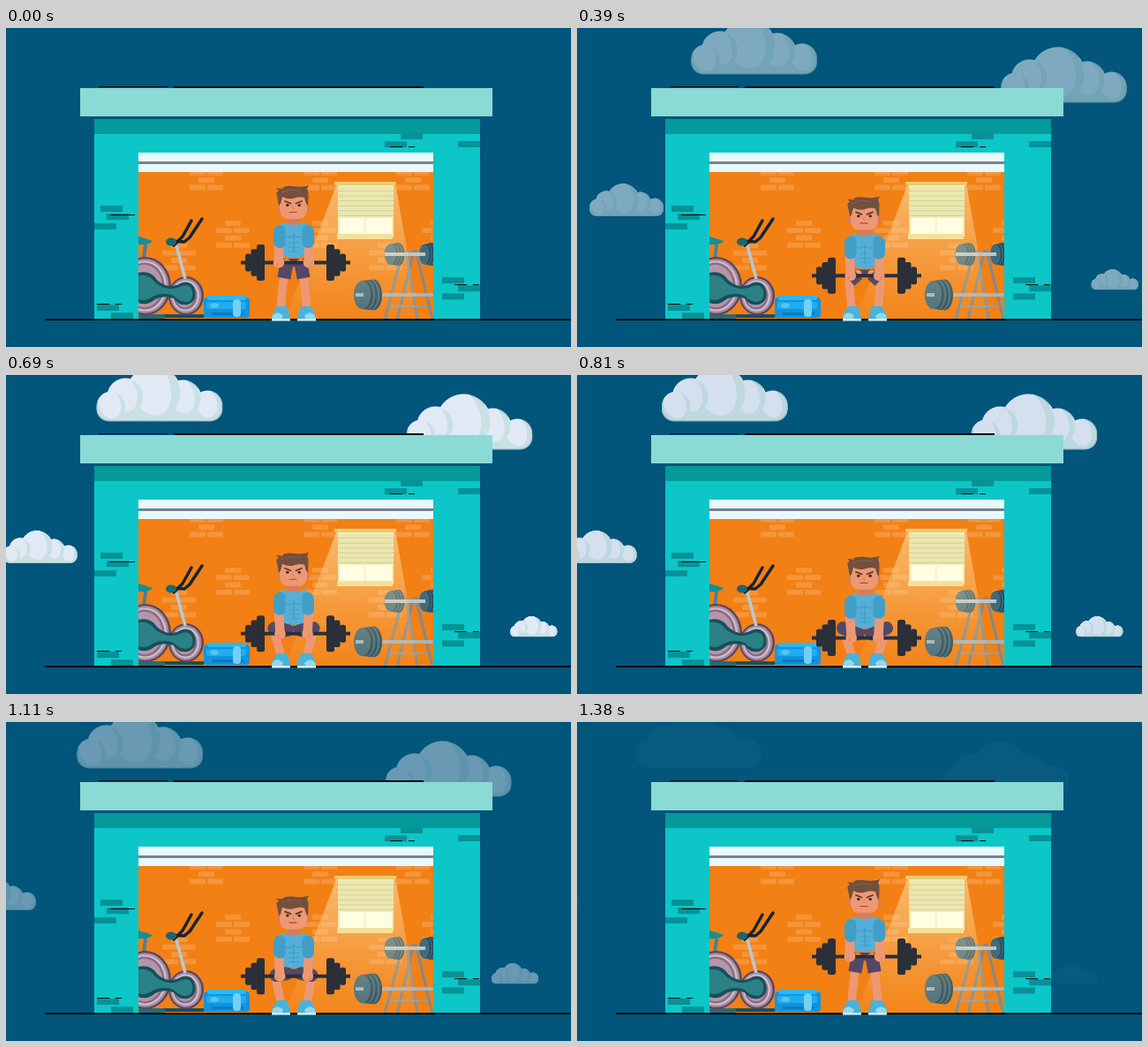
Recreate the animation shown at these times as an HTML page with a canvas. Size 640x361 px, loop 1410 ms.

```html
<!DOCTYPE html>
<html lang="en">
<head>
<meta charset="utf-8">
<title>Garage workout</title>
<style>
html, body { margin: 0; width: 100%; height: 100%; overflow: hidden; background: #02557b; }
canvas { display: block; }
</style>
</head>
<body>
<canvas id="stage" width="640" height="361"></canvas>
<script>
const LOOP = 1410, STEP = 30;
let g = document.getElementById('stage').getContext('2d');

const lerp = (a, b, k) => a + (b - a) * k;

function rect(x, y, w, h, color) {
  g.fillStyle = color;
  g.fillRect(x, y, w, h);
}
function round(x, y, w, h, r, color) {
  g.fillStyle = color;
  g.beginPath();
  g.roundRect(x, y, w, h, r);
  g.fill();
}
function oval(x, y, rx, ry, color, angle = 0) {
  g.fillStyle = color;
  g.beginPath();
  g.ellipse(x, y, rx, ry, angle, 0, Math.PI * 2);
  g.fill();
}
function line(points, width, color, cap = 'round') {
  g.strokeStyle = color;
  g.lineWidth = width;
  g.lineCap = cap;
  g.lineJoin = 'round';
  g.beginPath();
  points.forEach(([x, y]) => g.lineTo(x, y));
  g.stroke();
}
function shape(d, color) {
  g.fillStyle = color;
  g.fill(new Path2D(d));
}
function layer(w, h, draw) {
  const c = document.createElement('canvas'), main = g;
  c.width = w;
  c.height = h;
  g = c.getContext('2d');
  draw();
  g = main;
  return c;
}
// Draws something and its mirror image about a vertical axis.
function mirrored(axis, draw) {
  draw();
  g.save();
  g.translate(axis * 2, 0);
  g.scale(-1, 1);
  draw();
  g.restore();
}

// ---------- clouds ----------
const CLOUD_W = 146, CLOUD_H = 66;
const cloud = layer(CLOUD_W * 2, CLOUD_H * 2, () => {
  g.scale(2, 2);
  g.translate(1.5, 1.5);
  const lobes = [[126, 45, 17], [98, 37, 21], [65, 31, 31], [33, 35, 21], [17, 46, 17]];
  const silhouette = (inset, color) => {
    lobes.forEach(([x, y, r]) => oval(x, y, r - inset, r - inset, color));
    round(inset, 34 + inset, 143 - 2 * inset, 29 - 2 * inset, 14, color);
  };
  silhouette(0, '#a9c9cd');
  silhouette(1.2, '#cfe5e8');
  g.globalCompositeOperation = 'source-atop';
  for (const [x, y, r] of lobes) {
    oval(x, y, r - 1.2, r - 1.2, '#cfe5e8');
    oval(x - r * 0.12, y - r * 0.2, r * 0.72, r * 1.05, '#e8eef8', -0.35);
  }
});

function drawCloud(t, x, bottom, scale, before, after) {
  const left = x + (700 - t) * (t < 700 ? before : after);
  const h = CLOUD_H * scale;
  g.drawImage(cloud, left, bottom - h, CLOUD_W * scale, h);
}
function drawClouds(t) {
  g.globalAlpha = Math.max(0, Math.min(1, t / 710, (1400 - t) / 645));
  drawCloud(t, 100, 54, 1, 0.089, 0.052);
  drawCloud(t, 451, 86, 1, 0.088, 0.056);
  drawCloud(t, -5, 214, 0.59, 0.058, 0.113);
  drawCloud(t, 570, 297, 0.375, 0.038, 0.051);
  g.globalAlpha = 1;
}

// ---------- building ----------
// Rows of bricks, alternating between two and one, ending with two.
function softBricks(x, y, rows) {
  const color = 'rgba(255,225,200,.22)';
  for (let i = 0; i < rows; i++) {
    const single = (rows - i) % 2 === 0;
    const left = x + (single ? 10 : 0), top = y + i * 8.3;
    round(left, top, 18, 5.8, 1, color);
    if (!single) round(left + 20, top, 18, 5.8, 1, color);
  }
}
function wallBricks(x, y, shift, rows) {
  for (let i = 0; i < rows; i++) rect(x + (i % 2) * shift, y + i * 9.2, 25, 7, '#069296');
}
function crack(x, y) {
  rect(x, y, 14, 1, '#020c10');
  rect(x + 21, y, 7, 1, '#020c10');
}

function drawWindow() {
  const beam = g.createLinearGradient(0, 176, 0, 328);
  beam.addColorStop(0, 'rgba(255,236,185,.55)');
  beam.addColorStop(0.5, 'rgba(255,226,170,.3)');
  beam.addColorStop(1, 'rgba(255,215,150,.06)');
  shape('M375 176H441L468 329H316Z', beam);
  rect(376, 178, 63, 58, '#f2ebb4');
  for (let y = 180; y < 212; y += 5.6) {
    rect(376, y, 63, 4, '#ebe7b1');
    rect(376, y + 4, 63, 1, '#cfcf92');
  }
  rect(378, 215, 59, 19, '#fffde2');
  rect(406, 215, 1.5, 19, '#f2edc4');
  rect(372, 174, 70, 3.5, '#e8cd72');
  rect(375, 233, 63, 6, '#f3e19a');
}

function wheel(x, y, rx, ry) {
  ['#5d4660', '#a78c9f', '#d0bcc8', '#8a6a84', '#b596a8'].forEach((color, i) =>
    oval(x - i * 0.3, y, rx - i * 2.2, ry - i * 2.2, color));
}

function drawBike() {
  round(172, 324, 53, 4, 2, '#17505c');
  round(150, 324, 30, 5, 2, '#266b73');
  line([[158, 246], [155, 270]], 4, '#507f91');
  shape('M150 236Q158 238 166 241Q163 246 150 245Z', '#168f95');
  wheel(158, 292, 29, 33);
  wheel(204, 303, 20, 22);
  line([[193, 246], [203, 284]], 3.5, '#b6c8d5', 'butt');
  shape('M150 277Q164 274 171 285Q184 297 198 289Q209 285 213 294Q218 309 206 313Q196 315 190 306Q178 302 169 307Q160 315 150 311Z', '#15505b');
  shape('M150 280Q162 278 169 288Q184 300 199 292Q208 289 211 297Q213 309 204 310Q195 309 190 303Q178 298 166 304Q158 310 150 307Z', '#2b8186');
  line([[184, 241], [202, 242], [208, 237], [222, 216]], 3.5, '#162431');
  line([[190, 246], [200, 236], [210, 218]], 3.5, '#162431');
  oval(187, 242, 6, 4.5, '#1d6671');
}

function drawBox() {
  round(224, 305, 52, 23, 4, '#1094df');
  round(228, 303, 44, 5, 2, '#28b9f3');
  round(227, 310, 45, 8, 2, '#22acef');
  rect(233, 322, 36, 3, '#087bc4');
  round(257, 307, 9, 20, 4, '#71d0f4');
  oval(236, 314, 5, 3, '#55c4f3');
}

function weight(x, y, width, ry) {
  const rx = width * 0.3;
  for (let i = 0; i < 6; i++) {
    const center = lerp(x + width / 2 - rx, x - width / 2 + rx, i / 5);
    oval(center, y, rx, ry - i * 0.3, i % 2 ? '#416b7b' : '#25485a');
  }
}

function drawRack() {
  for (const [top, foot] of [[450, 429], [462, 443], [453, 466], [464, 483]])
    line([[top, 251], [foot, 330]], 3.2, '#85898a', 'butt');
  rect(434, 314, 44, 2, '#9c9b98');
  weight(440, 256, 23, 13);
  weight(478, 256, 20, 13);
  rect(429, 254, 46, 4, '#b9c7cd');
  weight(410, 302, 32, 17.5);
  rect(396, 300, 9, 4, '#9fb5bf');
  rect(426, 300, 58, 4, '#a8b3b7');
}

const scenery = layer(640, 361, () => {
  rect(84, 68, 467, 32, '#8bdad5');
  rect(100, 103, 437, 17, '#059999');
  rect(100, 120, 437, 209, '#0cc6c8');
  wallBricks(447, 119, -18, 2);
  wallBricks(512, 128, 0, 1);
  wallBricks(107, 201, 7, 2);
  wallBricks(100, 221, 0, 1);
  wallBricks(103, 313, 16, 2);
  wallBricks(494, 282, 18, 3);

  rect(150, 141, 334, 188, '#f28014');
  g.save();
  g.beginPath();
  g.rect(150, 141, 334, 188);
  g.clip();
  for (const x of [208, 337, 442]) softBricks(x, 161, 3);
  for (const x of [238, 337, 471]) softBricks(x, 218, 4);
  for (const x of [177, 411]) softBricks(x, 243.5, 4);
  rect(150, 141, 334, 22, '#e8f8fc');
  rect(150, 151, 334, 3, '#77828b');
  drawBike();
  drawBox();
  drawRack();
  drawWindow();
  g.restore();

  rect(44, 329, 596, 2, '#02090d');
  rect(105, 66, 78, 1, '#020c10');
  rect(190, 66, 283, 2, '#020c10');
  rect(118, 211, 28, 1, '#020c10');
  crack(435, 134);
  crack(103, 312);
  crack(508, 290);
});

// ---------- lifter ----------
const SKIN = '#ee9873', SHADE = '#d67c5b', SHIRT = '#55afd8', FOLD = '#3795be',
      SLEEVE = '#419fc7', SHORTS = '#554765', IRON = '#2a2f38', HAIR = '#72503d';

function drawLeg(drop, k) {
  const hip = [318, 266 + drop];
  const knee = [lerp(314, 299, k), lerp(288, 286, k)];
  const reach = lerp(0.78, 1, k);
  const hem = [lerp(hip[0], knee[0], reach), lerp(hip[1], knee[1], reach)];
  line([hip, knee, [311, 317]], 9.5, SKIN);
  line([hip, hem], 15, SHORTS, k < 0.5 ? 'butt' : 'round');
  shape('M307 315H318Q322 324 322 331H301Q300 324 307 315Z', '#4bb2d8');
  shape('M302 325Q308 319 314 326L312 330H301Z', '#91d9ec');
  rect(301, 329, 21, 2.5, '#dceef3');
}

function drawBarbell(y) {
  rect(266, y - 2, 124, 4, IRON);
  mirrored(328, () => {
    for (let i = 0; i < 3; i++) {
      const h = 41 - 10.5 * i;
      round(363 + 7.5 * i, y - h / 2, 9 - i, h, 2.5, IRON);
    }
  });
}

function drawTorso() {
  round(319, 212, 14, 12, 3, SHADE);
  shape('M314 220Q326 226 338 220Q347 224 345 236L339 257Q326 263 313 257L307 236Q305 224 314 220Z', SHIRT);
  line([[326, 232], [326, 254]], 0.8, FOLD);
  line([[315, 235], [320, 237], [326, 235], [332, 237], [337, 235]], 0.8, FOLD);
  for (let y = 243; y < 255; y += 5) line([[320, y], [332, y]], 0.6, FOLD);
}

function drawArm(drop, barY, k) {
  const x = lerp(309, 311, k);
  line([[309, 245 + drop], [x, barY]], 10.5, SKIN);
  oval(x, barY, 6.3, 6, SKIN);
  line([[x - 2, barY + 1], [x - 2, barY + 4]], 0.8, SHADE);
  round(303, 223 + drop, 13.5, 26, [8, 6, 6, 7], SLEEVE);
}

function drawHead() {
  mirrored(325.5, () => oval(310, 204.5, 3, 4.5, SHADE));
  shape('M310 190H341V206Q340 216 331 216H320Q311 216 310 206Z', SKIN);
  shape('M309 201L307 190Q305 186 309 184L306 181L313 182Q314 178 325 179Q335 181 343 178Q340 182 342 184Q343 187 342 201L340 199L338 192Q332 190 325 193Q318 194 313 191L311 199Z', HAIR);
  line([[312, 186], [321, 183], [334, 184]], 0.8, '#8d674f');
  mirrored(325.5, () => {
    line([[316, 196], [322.5, 198.5]], 1.8, '#5a3b2e');
    oval(318.8, 200.4, 1.8, 1.5, '#3a2b2a');
  });
  line([[325.5, 201], [324.5, 204.5], [327, 204.5]], 0.8, SHADE);
  line([[321, 208.5], [329, 208.5]], 1.2, '#a5473d');
}

function drawLifter(t) {
  const k = Math.max(0, t < 930 ? (t - 30) / 900 : (1380 - t) / 450);
  const drop = 31 * k, barY = 265.5 + 37 * k;
  const shifted = draw => {
    g.save();
    g.translate(0, drop);
    draw();
    g.restore();
  };
  rect(313, 261 + drop, 26, 9 - 4 * k, SHORTS);
  mirrored(326, () => drawLeg(drop, k));
  shifted(drawTorso);
  drawBarbell(barY);
  mirrored(326, () => drawArm(drop, barY, k));
  shifted(drawHead);
}

function drawFrame(t) {
  rect(0, 0, 640, 361, '#02557b');
  drawClouds(t);
  g.drawImage(scenery, 0, 0);
  drawLifter(t);
}

let start;
function tick(now) {
  start ??= now;
  drawFrame(Math.floor(((now - start) % LOOP) / STEP) * STEP);
  requestAnimationFrame(tick);
}
requestAnimationFrame(tick);
</script>
</body>
</html>
```
